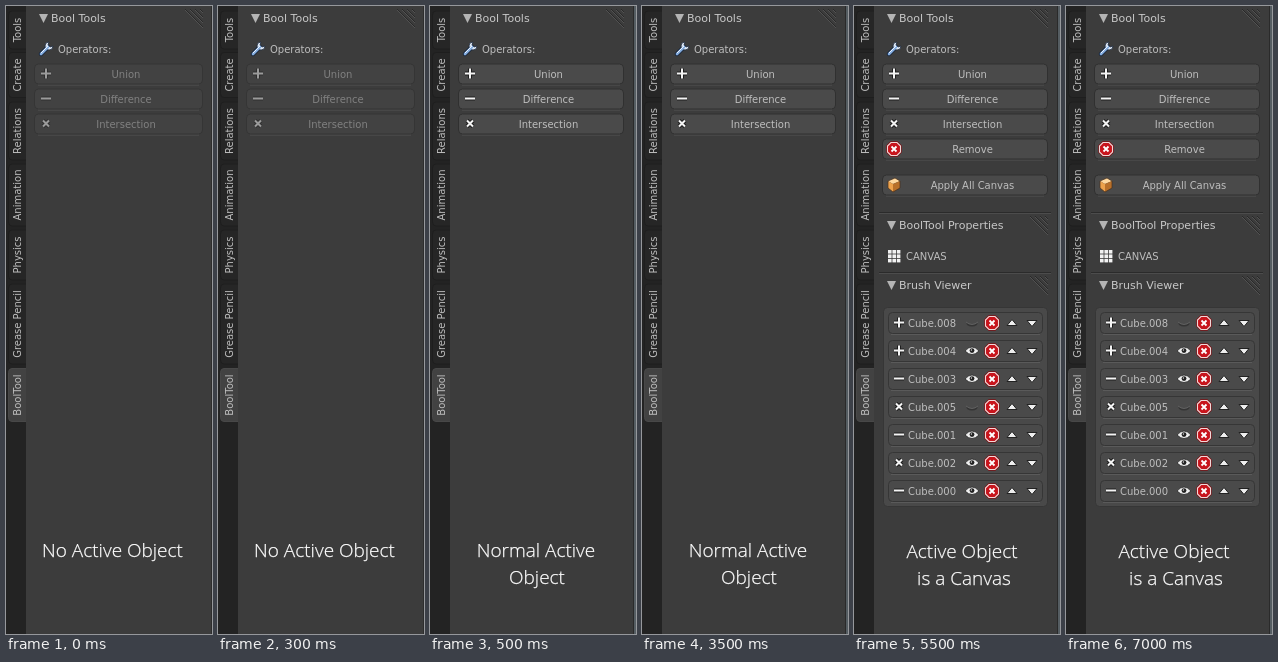
An HTML page that plays this animation: 206 by 628 pixels, repeating every 8000 ms.

```html
<!DOCTYPE html>
<html lang="en">
<head>
<meta charset="utf-8">
<title>Bool Tools panel</title>
<style>
html, body { margin: 0; width: 100%; height: 100%; overflow: hidden; background: #3c3c3c; }
svg { display: block; width: 206px; height: 628px; }
text { font: 10px "DejaVu Sans", sans-serif; fill: #bebebe; white-space: pre; }
.title { font-size: 11px; fill: #c8c8c8; }
.middle { text-anchor: middle; }
.caption {
  font: 300 19px "Open Sans", "Noto Sans", sans-serif;
  fill: #fff; stroke: #fff; stroke-width: .25px; text-anchor: middle;
}
.disabled { opacity: .5; }
</style>
</head>
<body>
<svg id="stage" viewBox="0 0 206 628"></svg>
<script>
const stage = document.getElementById('stage');

const rect = (x, y, w, h, fill, extra = '') =>
  `<rect x="${x}" y="${y}" width="${w}" height="${h}" fill="${fill}" ${extra}/>`;
const path = (d, extra) => `<path d="${d}" ${extra}/>`;
const text = (x, y, label, kind = '') => `<text x="${x}" y="${y}" class="${kind}">${label}</text>`;
const at = (x, y, content) => `<g transform="translate(${x} ${y})">${content}</g>`;

// A white stroke on a wider dark one keeps small symbols crisp.
const outlined = d =>
  path(d, 'fill="none" stroke="#1c1c1c" stroke-width="4"') +
  path(d, 'fill="none" stroke="#f4f4f4" stroke-width="2"');

const octagon = 'M-3-6.5H3L6.5-3V3L3 6.5H-3L-6.5 3V-3Z';
const icons = {
  plus: outlined('M-5-.5H5M0-5.5V4.5'),
  minus: outlined('M-5-.5H5'),
  times: outlined('M-3-3.5L3 2.5M3-3.5L-3 2.5'),
  remove:
    path(octagon, 'fill="#c8141c" stroke="#7c1014" stroke-width="2.4"') +
    path(octagon, 'fill="#c8141c" stroke="#f0d8d8" stroke-width="1.1"') +
    path('M-2.5-2.5L2.5 2.5M2.5-2.5L-2.5 2.5', 'stroke="#fff" stroke-width="1.8"'),
  cube:
    path('M-6-4L1-7L6-4L-1-1Z', 'fill="#ffd9a0"') +
    path('M-6-4L-1-1V7L-6 3Z', 'fill="#eda24c"') +
    path('M-1-1L6-4V3L-1 7Z', 'fill="#b8702a"') +
    path('M-6-4L1-7L6-4V3L-1 7L-6 3Z', 'fill="none" stroke="#49301a" stroke-width=".7"'),
  wrench:
    path('M-5 5L2-2', 'stroke="#17263c" stroke-width="4.5" stroke-linecap="round"') +
    path('M3-7A4 4 0 1 0 7-3L4-2L2-4Z', 'fill="#dfe8f4" stroke="#1d2a3e" stroke-width=".8"') +
    path('M-5 5L2-2', 'stroke="#86aee0" stroke-width="2.6" stroke-linecap="round"') +
    path('M-5 4L2-3', 'stroke="#eaf3ff"'),
  grid: [0, 1, 2].map(row => [0, 1, 2].map(col =>
    rect(-6 + col * 4.4, -6 + row * 4.4, 3.6, 3.6, '#f2f2f2')).join('')).join(''),
  eye:
    path('M-7 0Q0-8 7 0Q0 7-7 0Z', 'fill="#eee" stroke="#222" stroke-width=".8"') +
    '<circle cy="-.4" r="2.4" fill="#222"/><circle cx="-.6" cy="-1" r=".7" fill="#ddd"/>',
  closedEye: path('M-6-1Q0 4 6-1L5 2Q0 5-5 2Z', 'fill="#343434"') +
    path('M-6-1Q0 4 6-1', 'fill="none" stroke="#6a6a6a" stroke-width=".8"'),
  up: path('M-5 2.5L0-3.5L5 2.5Z', 'fill="#eee" stroke="#222"'),
  down: path('M-5-2.5L0 3.5L5-2.5Z', 'fill="#eee" stroke="#222"'),
};
const icon = (name, x, y) => at(x, y, icons[name]);

function tabs() {
  const list = [['Tools', 24, 38], ['Create', 69, 45], ['Relations', 125, 58], ['Animation', 189, 62],
    ['Physics', 249, 50], ['Grease Pencil', 318, 80], ['BoolTool', 389, 53]];
  return rect(0, 0, 20, 628, '#232323') + list.map(([label, y, length]) => {
    const active = label === 'BoolTool';
    const top = y - length / 2, bottom = y + length / 2;
    return path(`M20 ${top}H6Q2.5 ${top} 2.5 ${top + 4}V${bottom - 4}Q2.5 ${bottom} 6 ${bottom}H20`,
        `fill="${active ? '#424242' : '#262626'}" stroke="${active ? '#484848' : '#1e1e1e'}"`) +
      `<text class="middle" transform="translate(15 ${y}) rotate(-90)">${label}</text>`;
  }).join('');
}

function header(label, y, right) {
  let grip = '';
  for (let i = 0; i < 4; i++) {
    const d = `M${right - 18 + i * 5} ${y - 9}L${right} ${y + 9 - i * 5}`;
    grip += path(d, 'stroke="#292929"') + at(0, 1, path(d, 'stroke="#585858" stroke-width=".8"'));
  }
  return path(`M33 ${y - 4}H42L37.5 ${y + 5}Z`, 'fill="#b4b4b4"') +
    text(45, y + 4, label, 'title') + grip;
}

const separator = y => rect(25, y, 172, 1, '#2b2b2b') + rect(25, y + 1, 172, 1, '#4c4c4c');

function button(label, name, y, width, disabled) {
  return path(`M32 ${y + 11}H${width + 25}`, 'stroke="#525252"') +
    rect(28.5, y - 10, width, 20, disabled ? '#424242' : '#4a4a4a',
      `rx="4" stroke="${disabled ? '#353535' : '#303030'}"`) +
    `<g class="${disabled ? 'disabled' : ''}">` + icon(name, 40, y) +
    text(28.5 + width / 2 + 7.5, y + 4, label, 'middle') + '</g>';
}

function operators(width, disabled) {
  return header('Bool Tools', 12, width + 29) + icon('wrench', 40, 43) + text(52, 47, 'Operators:') +
    button('Union', 'plus', 68, width, disabled) +
    button('Difference', 'minus', 93, width, disabled) +
    button('Intersection', 'times', 118, width, disabled);
}

function brushRow([name, operation, eye], index) {
  const y = 317 + index * 28;
  return path(`M37 ${y + 11.5}H186`, 'stroke="#5a5a5a"') +
    rect(34.5, y - 10.5, 154, 21, '#4a4a4a', 'rx="4" stroke="#363636"') +
    icon(operation, 45, y) + text(54, y + 4, name) + icon(eye, 118, y) +
    icon('remove', 138, y) + icon('up', 158, y) + icon('down', 178, y);
}

const brushes = [
  ['Cube.008', 'plus', 'closedEye'], ['Cube.004', 'plus', 'eye'], ['Cube.003', 'minus', 'eye'],
  ['Cube.005', 'times', 'closedEye'], ['Cube.001', 'minus', 'eye'], ['Cube.002', 'times', 'eye'],
  ['Cube.000', 'minus', 'eye'],
];

const viewEdge = rect(203, 0, 1, 628, '#2a2a2a') + rect(204, 0, 2, 628, '#555d62');

const scenes = [
  { start: 0, content:
    operators(168, true) + rect(205, 0, 1, 628, '#2d2d2d') +
    text(106.5, 551, 'No Active Object', 'caption') },
  { start: 500, content:
    operators(165) + viewEdge +
    text(106, 551, 'Normal Active', 'caption') + text(107, 578, 'Object', 'caption') },
  { start: 5500, content:
    operators(165) + button('Remove', 'remove', 143, 165) + button('Apply All Canvas', 'cube', 179, 165) +
    separator(206) + header('BoolTool Properties', 219, 194) +
    icon('grid', 40, 250) + text(52, 254, 'CANVAS') +
    separator(266) + header('Brush Viewer', 279, 194) +
    rect(29.5, 301.5, 164, 199, '#494949', 'rx="4" stroke="#363636"') +
    brushes.map(brushRow).join('') + viewEdge +
    text(108, 552, 'Active Object', 'caption') + text(110, 579, 'is a Canvas', 'caption') },
];

stage.innerHTML = rect(0, 0, 206, 628, '#3c3c3c') + tabs() +
  scenes.map(scene => `<g class="scene">${scene.content}</g>`).join('');
const layers = stage.querySelectorAll('.scene');

function draw() {
  const time = performance.now() % 8000;
  const current = scenes.findLastIndex(scene => time >= scene.start);
  layers.forEach((layer, i) => layer.style.display = i === current ? '' : 'none');
  requestAnimationFrame(draw);
}
draw();
</script>
</body>
</html>
```
